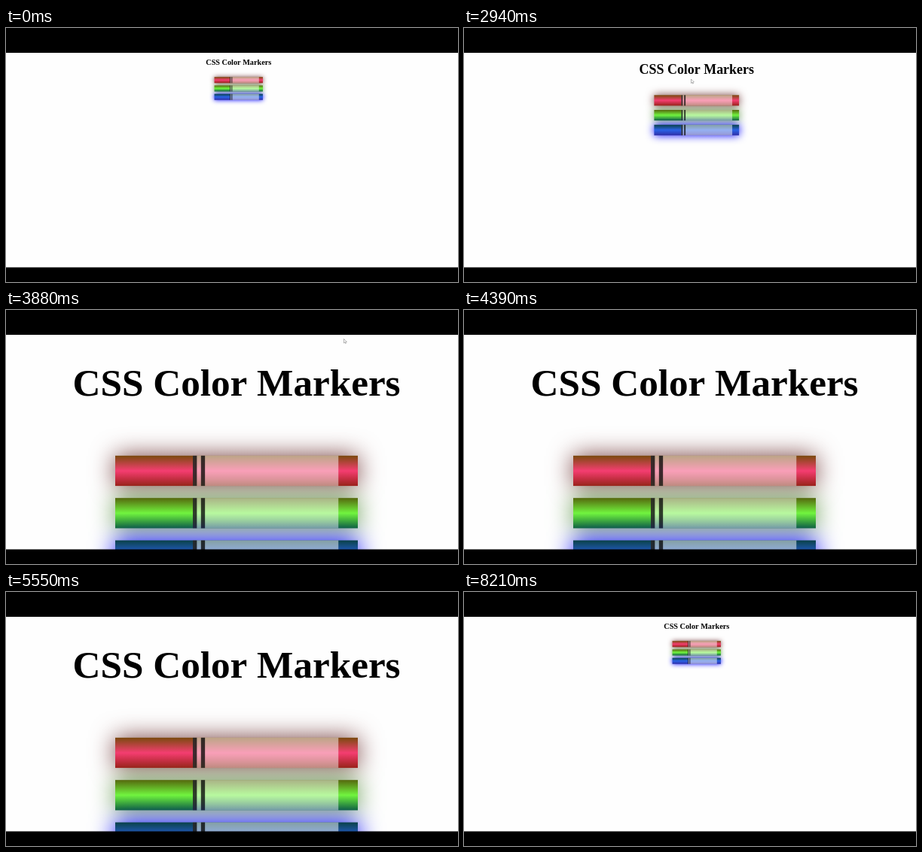
Write an HTML page with a canvas that moves like this. It is 600 px wide and 338 px high and loops after 8270 ms.

```html
<!DOCTYPE html>
<html lang="en">
<head>
<meta charset="utf-8">
<title>CSS Color Markers</title>
<style>
  html, body { margin: 0; width: 100%; height: 100%; overflow: hidden; background: #000; }
  canvas { display: block; width: 600px; height: 338px; }
</style>
</head>
<body>
<canvas id="stage" width="600" height="338"></canvas>
<script>
const ctx = document.getElementById('stage').getContext('2d');
const LOOP = 8270;
const UNIT = 0.322;               // stage pixels per page pixel at 100 % zoom
const TOP = 33, BOTTOM = 318.5;   // visible page between the black bars

// Zooming in climbs the browser's ladder at an even pace, then resets at once
const LADDER = [1, 1.1, 1.25, 1.5, 1.75, 2, 2.5, 3, 4, 5];
const ZOOM_IN = 2390, STEP = 112, RESET = 6060;

// Pointer moves: start, end, and where the tip arrives
const SHOW = 430;
const moves = [
  { from: 880, to: 1600, x: 294, y: 58 },
  { from: 1900, to: 2500, x: 301.5, y: 68 },
  { from: 3420, to: 3880, x: 448.5, y: 38.5 },
  { from: 3880, to: 4220, x: 504, y: 22 },
  { from: 5820, to: 5920, x: 504, y: 29.5 },
  { from: 6400, to: 6500, x: 504, y: 22 }
];

const markers = [
  { fill: ['rgb(122,74,14)', 'rgb(245,62,113)', 'rgb(162,27,27)'], glow: 'rgba(83,14,14,0.8)' },
  { fill: ['#55680d', '#71f53e', '#116c31'], glow: 'rgba(59,126,32,0.8)' },
  { fill: ['hsl(186,76%,16%)', 'rgb(42,98,230)', 'hsl(240,56%,42%)'], glow: 'rgb(0,0,255)' }
];

const clamp = (v, lo, hi) => Math.min(hi, Math.max(lo, v));
const ease = k => k * k * (3 - 2 * k);

function zoomAt(t) {
  if (t >= RESET) return 1;
  return LADDER[clamp(Math.floor((t - ZOOM_IN) / STEP), 0, LADDER.length - 1)];
}

function pointerAt(t) {
  let x = 494, y = 121;
  for (const m of moves) {
    const k = ease(clamp((t - m.from) / (m.to - m.from), 0, 1));
    x += (m.x - x) * k;
    y += (m.y - y) * k;
  }
  return [x, y];
}

function drawMarker({ fill, glow }, x, y, scale) {
  const body = ctx.createLinearGradient(0, y, 0, y + 25);
  fill.forEach((color, i) => body.addColorStop(i / 2, color));
  ctx.save();
  ctx.shadowColor = glow;
  ctx.shadowBlur = 20 * scale;
  ctx.fillStyle = body;
  ctx.fillRect(x, y, 200, 25);
  ctx.restore();

  ctx.fillStyle = 'rgba(255,255,255,0.5)';
  ctx.fillRect(x + 64, y, 120, 25);
  ctx.fillStyle = 'rgba(0,0,0,0.75)';
  for (const bar of [64, 70.7]) ctx.fillRect(x + bar, y, 3.3, 25);
}

function drawPage(zoom) {
  const scale = UNIT * zoom;
  const center = zoom >= 4 ? 306 : 308.75;   // the scrollbar narrows tall pages
  ctx.save();
  ctx.translate(center, TOP);
  ctx.scale(scale, scale);
  ctx.fillStyle = '#000';
  ctx.font = 'bold 31.8px "Liberation Serif", "Times New Roman", serif';
  ctx.textAlign = 'center';
  ctx.fillText('CSS Color Markers', 0, 50.5);
  markers.forEach((m, i) => drawMarker(m, -100, 99.9 + 35 * i, scale));
  ctx.restore();
}

function drawPointer([x, y]) {
  ctx.save();
  ctx.translate(x, y);
  ctx.scale(UNIT, UNIT);
  const arrow = new Path2D('M0 0V17L4 13.5L6.6 19L9 18L6.5 12.5L12 12Z');
  ctx.fillStyle = '#fff';
  ctx.fill(arrow);
  ctx.lineWidth = 1.5;
  ctx.strokeStyle = '#666';
  ctx.stroke(arrow);
  ctx.restore();
}

function draw(t) {
  ctx.fillStyle = '#fefefe';
  ctx.fillRect(0, 0, 600, 338);
  drawPage(zoomAt(t));
  if (t >= SHOW) drawPointer(pointerAt(t));
  ctx.fillStyle = '#000';
  ctx.fillRect(0, 0, 600, TOP);
  ctx.fillRect(0, BOTTOM, 600, 338 - BOTTOM);
}

const begin = performance.now();
function tick() {
  draw((performance.now() - begin) % LOOP);
  requestAnimationFrame(tick);
}
tick();
</script>
</body>
</html>
```
